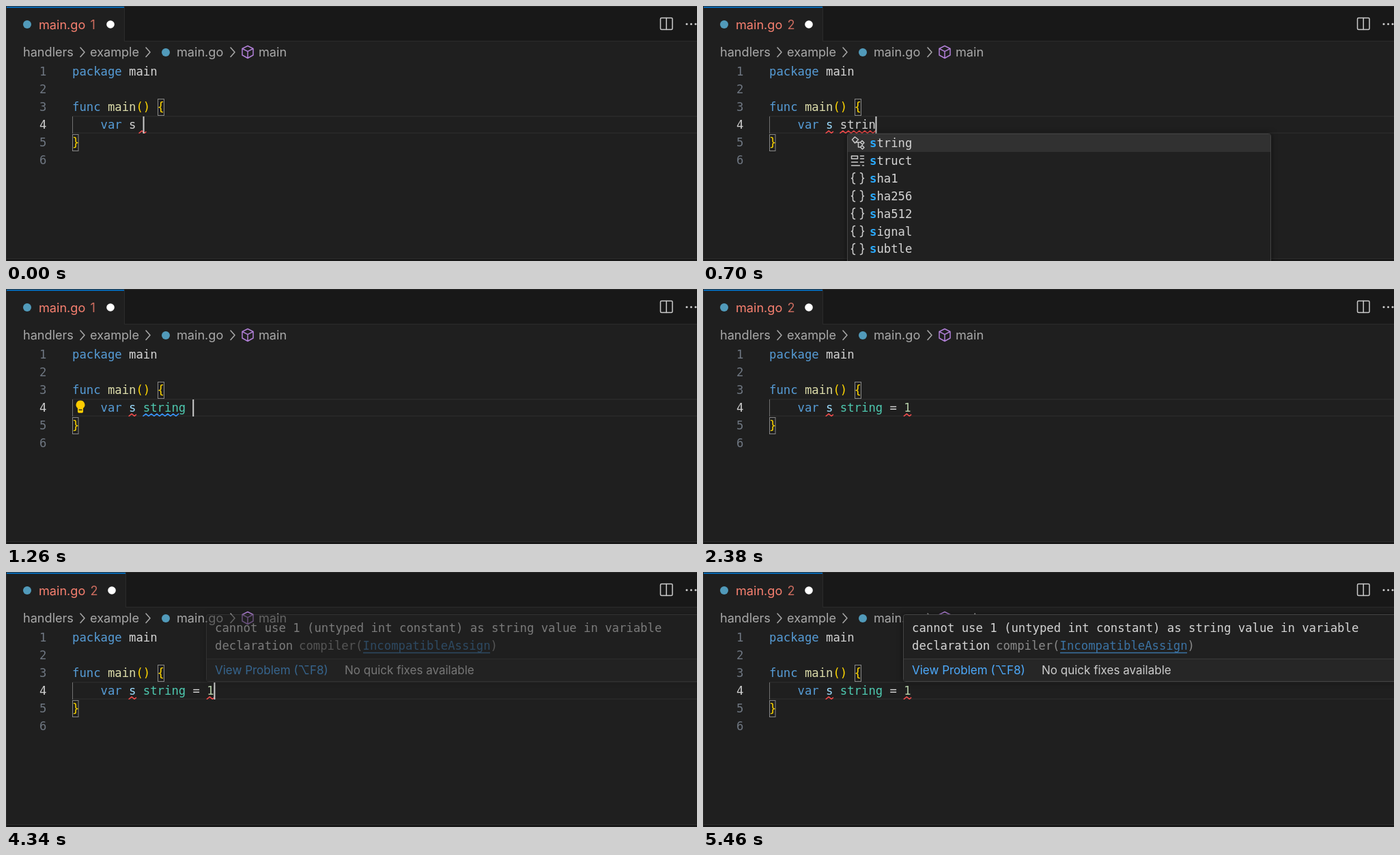
Animation, 1012 px wide and 374 px high, one loop 5.53 s. Source, as an HTML page:

```html
<!DOCTYPE html>
<html lang="en">
<head>
<meta charset="utf-8">
<title>Editor typing demo</title>
<style>
  html, body { margin: 0; width: 100%; height: 100%; overflow: hidden; background: #1f1f1f; }
  svg { display: block; }
  text { white-space: pre; fill: #d4d4d4; }
  .ui text { font: 18.1px Inter, "Open Sans", sans-serif; fill: #a9a9a9; }
  .code text { font: 17.25px "DejaVu Sans Mono", monospace; }
  .line { fill: none; stroke-width: 1.5; stroke-linejoin: round; stroke-linecap: round; }
  .pop { filter: drop-shadow(0 0 4px rgba(0, 0, 0, .5)); }
  .code .num { fill: #6e7681; }
  .code .now { fill: #cccccc; }
  .code .kw { fill: #569cd6; }
  .code .fn { fill: #dcdcaa; }
  .code .par { fill: #ffd700; }
  .code .type { fill: #4ec9b0; }
  .code .var { fill: #9cdcfe; }
  .code .lit { fill: #b5cea8; }
  .code .dim { fill: #8a8a8a; }
  .code .link { fill: #3b73a4; }
  .hit { fill: #2aaaff; font-weight: bold; }
  .ui .err { fill: #f88070; }
  .ui .foot { font-size: 17px; fill: #cccccc; }
  .ui .act { fill: #4daafc; }
</style>
</head>
<body>
<svg width="1012" height="374" viewBox="0 0 1012 374">
  <rect width="1012" height="374" fill="#1f1f1f"/>
  <g class="ui">
    <rect id="bar" y="1" width="1012" height="50" fill="#181818"/>
    <path d="M0 .5H1012M0 51.5H1012" stroke="#2b2b2b"/>
    <rect id="tab" y="1" height="51" fill="#1f1f1f"/>
    <rect id="tabTop" y="1" height="1.6" fill="#0078d4"/>
    <rect id="tabEdge" y="1" width="1" height="51" fill="#2b2b2b"/>
    <circle cx="31" cy="27" r="6" fill="#519aba"/>
    <text class="err" x="48" y="33.5">main.go</text>
    <text class="err" id="count" x="123.5" y="33.5" opacity=".8"></text>
    <circle id="dirty" cy="27" r="5.8" fill="#fff"/>
    <g class="line" stroke="#cccccc">
      <rect x="958.5" y="17.5" width="17.5" height="17" rx="1.5"/>
      <path d="M967.2 17.5v17"/>
    </g>
    <g fill="#cccccc">
      <circle cx="997" cy="26.5" r="1.5"/><circle cx="1003.5" cy="26.5" r="1.5"/><circle cx="1010" cy="26.5" r="1.5"/>
    </g>
    <text x="25" y="74">handlers</text>
    <text x="123" y="74">example</text>
    <circle cx="234" cy="68" r="6" fill="#519aba"/>
    <text x="250" y="74">main.go</text>
    <text x="370" y="74">main</text>
    <path class="line" stroke="#a9a9a9" d="M109 61l6 6.7-6 6.7M205 61l6 6.7-6 6.7M329 61l6 6.7-6 6.7"/>
    <path class="line" stroke="#b180d7" d="M354 58.5l8 4v9.5l-8 4.5-8-4.5v-9.5zM346 62.5l8 4.2 8-4.2M354 66.7v9.8"/>
  </g>
  <path d="M.5 1V374M0 370.5H1012" stroke="#2b2b2b"/>
  <rect x="1" y="371" width="1011" height="3" fill="#181818"/>

  <path d="M97 161.7H1012M97 186.3H1012" stroke="#2a2a2a" stroke-width="1.6"/>
  <path d="M97.5 162V187" stroke="#707070"/>
  <g fill="none" stroke="#888"><rect x="222.5" y="136.5" width="9" height="24"/><rect x="97.5" y="188.5" width="8.5" height="24"/></g>
  <g class="code" id="code"></g>
  <g class="line" id="marks"></g>
  <g id="bulb">
    <path fill="#ffcc00" d="M109 163.5a6.4 6.4 0 0 1 4 11.4v5q0 1.8-1.8 1.8h-4.4q-1.8 0-1.8-1.8v-5a6.4 6.4 0 0 1 4-11.4z"/>
    <path d="M106.5 177.3h5" stroke="#1f1f1f" stroke-width="1.4"/>
  </g>
  <rect id="caret" y="162" width="2" height="25" fill="#cccccc"/>

  <g class="code pop" id="list"></g>
  <g class="code pop" id="words"></g>

  <g class="pop" id="hover">
    <rect x="293.5" y="62.5" width="760" height="98" rx="3" fill="#202020" stroke="#454545"/>
    <rect x="294" y="127" width="740" height="33" fill="#262626"/>
    <path d="M294 127.5H1012" stroke="#3a3a3a"/>
    <g class="code">
      <text x="306" y="88">cannot use 1 (untyped int constant) as string value in variable</text>
      <text x="306" y="113.5">declaration</text>
      <text class="dim" x="429" y="113.5">compiler(</text>
      <text class="link" x="522.6" y="113.5">IncompatibleAssign</text>
      <text class="dim" x="709.5" y="113.5">)</text>
      <path d="M523 118.5H709" stroke="#3b73a4" stroke-width="1.4"/>
    </g>
    <g class="ui">
      <text class="foot act" x="306" y="150">View Problem (⌥F8)</text>
      <text class="foot" x="496" y="150">No quick fixes available</text>
    </g>
  </g>
</svg>
<script>
const LOOP = 5530, TAIL = 'string = 1';
const KEYS = [350, 490, 560, 630, 700, 770, 1260, 1400, 1540, 1820];
const CARET_OFF = [[70, 350], [2310, 2870], [3360, 3850], [4410, 4970], [5460, LOOP]];
const RED = '#f14c4c', BLUE = '#3794ff';
const $ = id => document.getElementById(id);
const col = n => 97 + n * 10.385;
const row = n => 102.3 + (n - 1) * 25.85;
const within = (t, a, b) => t >= a && t < b;
const token = (line, c, cls, s) => `<text class="${cls}" x="${col(c)}" y="${row(line)}">${s}</text>`;

function squiggle(x, end, color, y = 186.3) {
  let d = `M${x} ${y}`;
  for (let up = true; x < end; up = !up) {
    const step = Math.min(4, end - x);
    d += `l${step} ${(up ? -1 : 1) * step * .8}`;
    x += step;
  }
  return `<path d="${d}" stroke="${color}"/>`;
}

// Icons are drawn around the centre of an 18px cell.
const ICONS = {
  type: '<path d="M-8-5l4-4 5 4-5 5zM-2-1h6M1-1v7h3M4-1l2.500-2.500 3 3-2.500 2.500zM4 6l2.500-2.500 3 3-2.500 2.500z"/>',
  struct: '<path d="M-9-7h9v4h-9zM4-7h5M4-3h5M-9 2h9M4 2h5M-9 7h12M7 7h2"/>',
  pkg: '<path d="M-4-8q-3 0-3 3v2q0 3-2 3 2 0 2 3v2q0 3 3 3M4-8q3 0 3 3v2q0 3 2 3-2 0-2 3v2q0 3-3 3"/>'
};

function popup(width, rows, hit, items) {
  const height = rows * 25.9 + 2;
  const body = items.map(([icon, word], i) => {
    const y = 201 + i * 25.9;
    return `<g class="line" stroke="#cccccc" transform="translate(226.500 ${y})">${ICONS[icon]}</g>` +
      `<text x="244" y="${y + 6}"><tspan class="hit">${word.slice(0, hit)}</tspan>${word.slice(hit)}</text>`;
  }).join('');
  return `<rect x="211.5" y="187.5" width="${width}" height="${height}" rx="3" fill="#202020" stroke="#454545"/>` +
    `<rect x="212" y="188" width="${width - 1}" height="26" fill="#313131"/>` + body;
}

$('list').innerHTML = popup(620, 12, 1, [
  ['type', 'string'], ['struct', 'struct'], ['pkg', 'sha1'], ['pkg', 'sha256'],
  ['pkg', 'sha512'], ['pkg', 'signal'], ['pkg', 'subtle'], ['struct', 'switch']
]);
$('words').innerHTML = popup(656, 6, 6, [
  ['type', 'string'], ['pkg', 'strings'], ['pkg', 'stringset'],
  ['pkg', 'stringintconv'], ['pkg', 'stringslite'], ['pkg', 'stringer']
]);

const numbers = [1, 2, 3, 4, 5, 6].map(n =>
  `<text class="${n === 4 ? 'now' : 'num'}" x="49" y="${row(n)}">${n}</text>`).join('');
const fixed = numbers +
  token(1, 0, 'kw', 'package') + token(1, 8, '', 'main') +
  token(3, 0, 'kw', 'func') + token(3, 5, 'fn', 'main') + token(3, 9, 'par', '()') +
  token(3, 12, 'par', '{') + token(4, 4, 'kw', 'var') + token(5, 0, 'par', '}');

function show(id, on) { $(id).style.display = on ? '' : 'none'; }

function setTab(count) {
  const edge = count === 2 ? 175 : 173;
  $('count').textContent = count;
  $('tab').setAttribute('width', edge);
  $('tabTop').setAttribute('width', edge);
  $('tabEdge').setAttribute('x', edge);
  $('dirty').setAttribute('cx', count === 2 ? 155 : 153);
}

function marks(t, typed) {
  let out = '';
  if (t < 350) out += squiggle(195, 205, RED);
  if (within(t, 350, 1050)) out += squiggle(col(10), col(10 + Math.min(typed, 5)), RED);
  if (within(t, 1050, 1330)) out += squiggle(col(10), col(15), BLUE);
  if (within(t, 560, 1400) || t >= 1890) out += squiggle(col(8), col(9), RED);
  if (within(t, 1400, 1890)) out += squiggle(97, 106, RED, 213.5);
  if (t >= 1890) out += squiggle(col(19), col(20), RED);
  return out;
}

let last = -1;
function draw() {
  const t = Math.floor(performance.now() % LOOP / 70) * 70;
  if (t !== last) {
    last = t;
    const typed = KEYS.filter(k => k <= t).length;
    const tail = TAIL.slice(0, typed);
    $('code').innerHTML = fixed + token(4, 8, typed ? 'var' : '', 's') +
      token(4, 10, typed > 5 ? 'type' : '', tail.slice(0, 6)) +
      token(4, 17, '', tail.slice(7, 8)) + token(4, 19, 'lit', tail.slice(9));
    $('marks').innerHTML = marks(t, typed);
    $('caret').setAttribute('x', col(10 + typed) - .3);
    show('caret', !CARET_OFF.some(([a, b]) => within(t, a, b)));
    show('bulb', within(t, 1120, 2100));
    show('list', within(t, 420, 770));
    show('words', within(t, 770, 1260));
    setTab(within(t, 560, 1260) || t >= 1890 ? 2 : 1);
    $('hover').style.opacity = t < 4340 ? 0 : t < 4410 ? .5 : t < 4480 ? .9 : 1;
  }
  requestAnimationFrame(draw);
}
draw();
</script>
</body>
</html>
```
